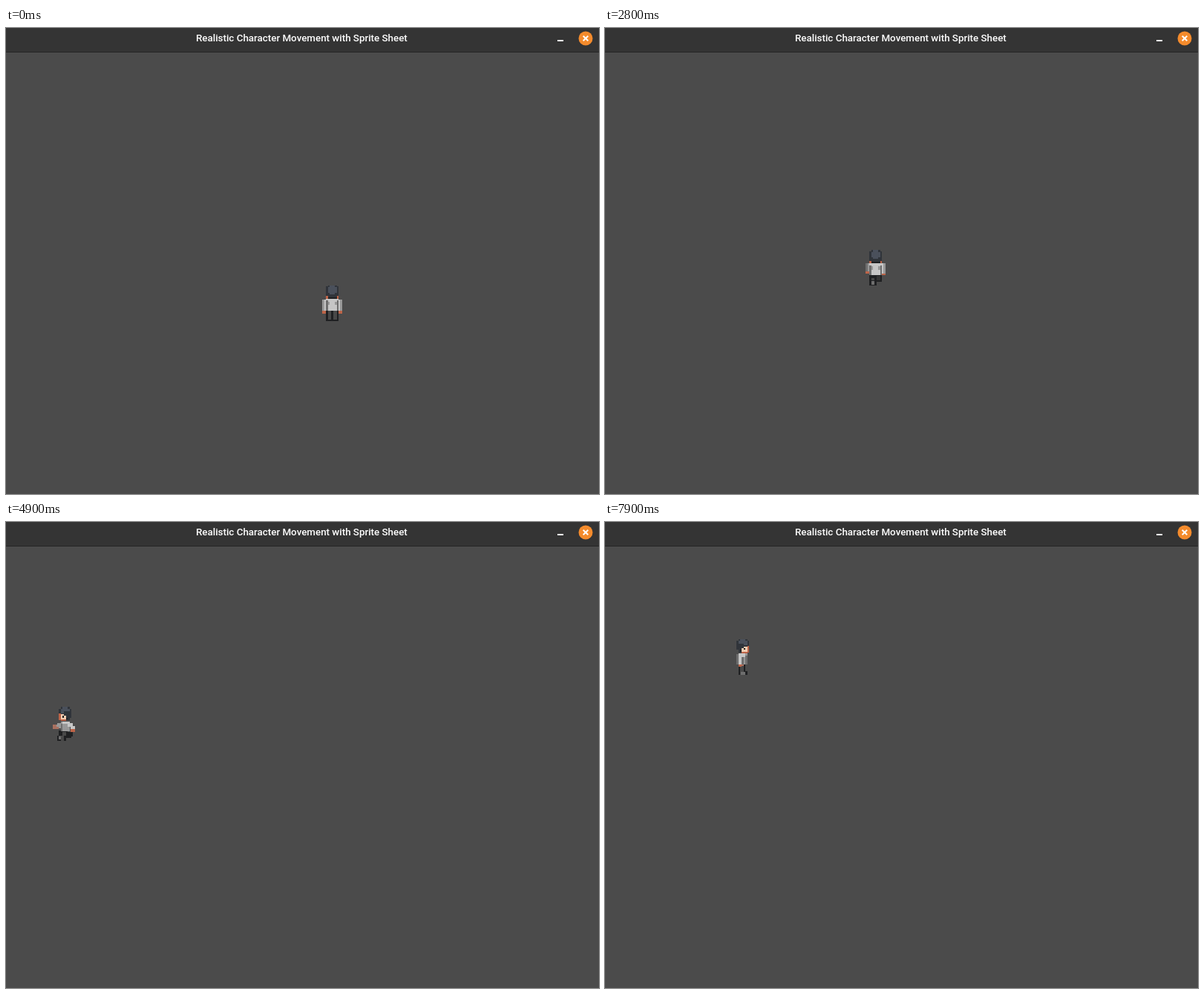
Animation of 799 by 628 pixels, one loop 8 s. Source, as an HTML page with a canvas:

```html
<!DOCTYPE html>
<html lang="en">
<head>
<meta charset="utf-8">
<title>Character Movement</title>
<style>
html, body { margin: 0; width: 799px; height: 628px; overflow: hidden; background: #4b4b4b; }
canvas { position: absolute; left: 0; top: 0; }
#title {
  position: absolute; left: 256px; top: 4px; line-height: 20px; white-space: nowrap;
  color: #fff; font: 500 13px/20px Roboto, "Open Sans", sans-serif;
}
</style>
</head>
<body>
<canvas id="stage" width="799" height="628"></canvas>
<span id="title">Realistic Character Movement with Sprite Sheet</span>
<script>
const ctx = document.getElementById('stage').getContext('2d');
const title = document.getElementById('title');
title.style.fontSize = 13 * 285 / title.getBoundingClientRect().width + 'px';

const UNIT = 2.4, COLS = 11, ROWS = 20, TICK = 100, LOOP = 8000;
const INK = '#1f2022', HAIR = '#30343a', SLATE = '#4a505b', WHITE = '#c6c6c6', GREY = '#989898',
  SHADE = '#6e6e6e', TROUSER = '#484848', SKIN = '#f3cdb2', RED = '#bd6448', DIM = '#a8705f';

// tick, centre x, ground y
const path = [
  [3, 439.5, 395], [6, 439.5, 350], [7, 434.5, 335], [8, 419.5, 320], [14, 329.5, 320],
  [15, 319.5, 320], [16, 329.5, 325], [21, 404.5, 400], [22, 404.5, 415], [23, 389.5, 415],
  [24, 374.5, 405], [25, 364.5, 390], [30, 364.5, 315], [31, 349.5, 300], [32, 334.5, 295],
  [49, 79.5, 295], [50, 65.5, 295], [55, 65.5, 295], [56, 65.5, 285], [66, 65.5, 135],
  [67, 65.5, 121], [71, 65.5, 121], [73, 95.5, 121], [74, 110.5, 131], [79, 185.5, 206]
];
const turns = [[0, 'up'], [7, 'left'], [15, 'right'], [23, 'left'], [25, 'up'],
  [31, 'left'], [55, 'up'], [72, 'right']];

function place(tick) {
  if (tick <= path[0][0]) return path[0].slice(1);
  const i = path.findIndex(p => p[0] >= tick), a = path[i - 1], b = path[i];
  const k = (tick - a[0]) / (b[0] - a[0]);
  return [a[1] + (b[1] - a[1]) * k, a[2] + (b[2] - a[2]) * k];
}

// Walk cycle: 0 stand, 1 step, 2 stand, 3 other step; three poses per four ticks
function stride(tick) {
  if (tick < 4) return 0;
  const shift = tick < 23 ? 0 : tick < 49 ? 3 : 4;
  return Math.floor((3 * tick + shift) / 4) % 4;
}

function pen(cx, ground, flip) {
  const px = c => Math.round(cx + (c - COLS / 2) * UNIT);
  const py = r => Math.round(ground + (r - ROWS) * UNIT);
  return (x, y, w, h, color) => {
    const l = px(flip ? COLS - x - w : x), r = px(flip ? COLS - x : x + w);
    ctx.fillStyle = color;
    ctx.fillRect(l, py(y), r - l, py(y + h) - py(y));
  };
}

function backBody(box, y) {
  box(3, y, 5, 1, HAIR);
  box(2, y + .5, 7, 6.5, HAIR);
  box(3, y + 1, 5, 3, SLATE);
  box(4, y, 3, 5, SLATE);
  box(2, y + 6, 1, 1.5, RED);
  box(8, y + 6, 1, 1.5, RED);
  box(3, y + 6.5, 5, 1, INK);
  box(2, y + 7.3, 7, 6.7, WHITE);
  box(2, y + 8.5, 1, 5.5, SHADE);
  box(8, y + 8.5, 1, 5.5, SHADE);
  box(3, y + 9, 1, 2, GREY);
  box(7, y + 9, 1, 2, GREY);
}

function backStand(box) {
  for (const [edge, arm, leg] of [[0, 1, 3], [10, 9, 6]]) {
    box(edge, 8, 1, 6, GREY);
    box(arm, 8, 1, 6, WHITE);
    box(Math.min(edge, arm), 14, 2, 1.8, RED);
    box(leg - 1, 14, 4, 6, INK);
    box(leg, 14, 2, 5, TROUSER);
  }
  box(5, 14, 1, 6, INK);
  backBody(box, 0);
}

function backStep(box) {
  box(0, 8.5, 1, 4.5, SHADE);
  box(1, 8.5, 1, 4.5, GREY);
  box(0, 13, 2, 1, RED);
  box(9, 8.5, 1, 6, WHITE);
  box(10, 8.5, 1, 6, GREY);
  box(9, 14, 2, 1, RED);
  box(2, 14.5, 4, 6.5, INK);
  box(3, 16.5, 2, 1.5, TROUSER);
  box(3, 18.5, 2, 2, SHADE);
  box(5, 14.5, 4, 4.3, INK);
  box(6, 15.5, 2, 2.5, '#333');
  backBody(box, 1);
}

function sideHead(box, y) {
  box(3, y, 5, 1, HAIR);
  box(2, y + 1, 7, 3, HAIR);
  box(2, y + 4, 4, 2, HAIR);
  box(3, y + 6, 3, 1.5, HAIR);
  box(4, y, 3, 2.5, SLATE);
  box(3, y + 1, 5, 1.5, SLATE);
  box(6, y + 2.5, 2, 1, SLATE);
  box(6, y + 4, 2, 1, SKIN);
  box(5, y + 5, 3, 2, SKIN);
  box(8, y + 3.7, 1, 3.6, RED);
  box(4, y + 6, 1, 1, INK);
  box(6, y + 5, 1, 1, INK);
  box(5, y + 7, 3, .8, RED);
}

function sideStand(box) {
  box(3, 14, 1, 6, INK);
  box(4, 14, 2, 4, TROUSER);
  box(6, 13.5, 1, 5, INK);
  box(7, 18, 1, 2, INK);
  box(4.5, 18.5, 2.5, 1.5, SHADE);
  box(3, 8, 5, 6, GREY);
  box(2, 8.5, 1, 5.5, SHADE);
  box(7, 9, 1, 5, SHADE);
  box(3, 8, 4, 2, WHITE);
  box(3, 10, 2, 4, WHITE);
  box(5, 10, 1, 4, SHADE);
  box(3, 14, 2, 1.3, RED);
  box(5, 14, 1, 1.2, DIM);
  sideHead(box, 0);
}

function sideStep(box, other, reach) {
  const rear = other ? TROUSER : INK, fore = other ? INK : TROUSER;
  box(1, 15, 4, 2.3, INK);
  box(2, 16, 3, 2.3, rear);
  box(4, 14, 5, 3, INK);
  box(5, 15, 2, 4, fore);
  box(5, 17, 1.2, 3, INK);
  box(6, 18, 3, 2, fore);
  box(8, 17.5, 2, 1.5, SHADE);
  box(9, 17, 1, 2, INK);
  box(8, 19, 2, 1, INK);
  box(3, 9, 5, 5.5, GREY);
  box(3, 9, 4, 1.5, WHITE);
  box(7, 10.5, 1, 4, SHADE);
  const back = other ? GREY : WHITE, front = other ? WHITE : GREY;
  box(1, 10, 3, 2, back);
  box(0, 11.5, 2.5, 2.5, back);
  box(0, 13.5, 2.5, 1.3, other ? DIM : RED);
  box(8, 10, 2, 3, front);
  box(9, 11, reach - 9, 2.4, other ? RED : DIM);
  box(9, 11, 1.5, 1, other ? SKIN : front);
  sideHead(box, 1);
}

function windowBar() {
  ctx.fillStyle = '#4b4b4b';
  ctx.fillRect(0, 0, 799, 628);
  ctx.fillStyle = '#343434';
  ctx.fillRect(0, 0, 799, 32);
  ctx.fillStyle = '#252525';
  ctx.fillRect(0, 32, 799, 1);
  ctx.fillStyle = '#fff';
  ctx.fillRect(743, 16, 8, 2);
  ctx.fillStyle = '#f48b2c';
  ctx.beginPath();
  ctx.arc(781, 14, 9.5, 0, 7);
  ctx.fill();
  ctx.strokeStyle = '#fff';
  ctx.lineWidth = 2;
  ctx.beginPath();
  ctx.moveTo(777.7, 10.7); ctx.lineTo(784.3, 17.3);
  ctx.moveTo(784.3, 10.7); ctx.lineTo(777.7, 17.3);
  ctx.stroke();
}

function draw(tick) {
  windowBar();
  const [x, y] = place(tick), pose = stride(tick);
  const facing = turns.filter(t => t[0] <= tick).pop()[1];
  const up = facing === 'up', left = facing === 'left', other = pose === 3;
  const box = pen(x, y, up ? other : left);
  if (pose % 2 === 0) (up ? backStand : sideStand)(box);
  else if (up) backStep(box);
  else sideStep(box, other, other && !left ? 11 : 12.3);
}

const start = performance.now();
function frame(now) {
  draw(Math.floor(Math.max(0, now - start) % LOOP / TICK));
  requestAnimationFrame(frame);
}
draw(0);
requestAnimationFrame(frame);
</script>
</body>
</html>
```
